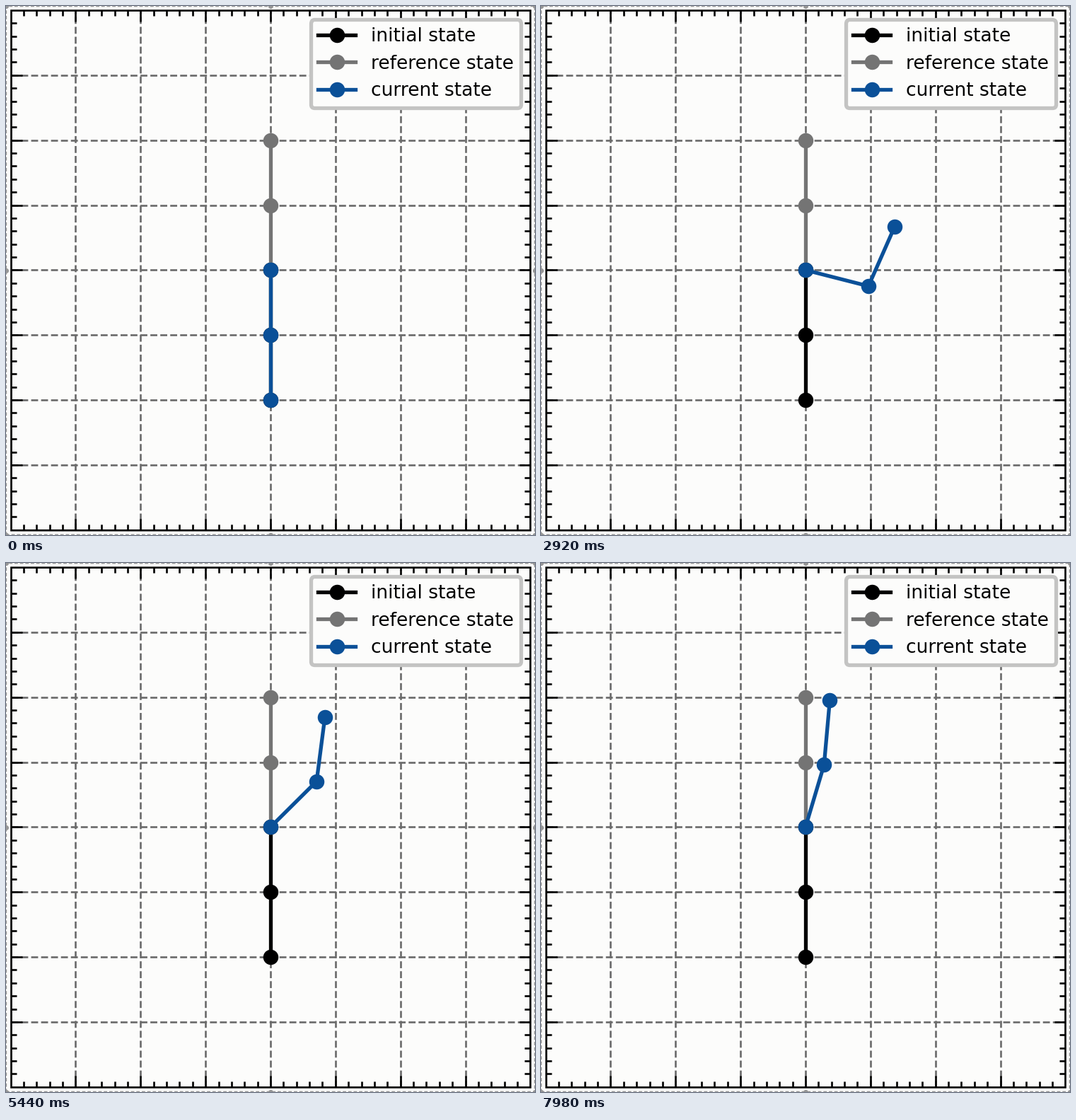
These frames come from a looping animation (748 px wide and 748 px high, 8 s). A matplotlib script:

```python
import numpy as np
import matplotlib.pyplot as plt
from matplotlib.animation import FuncAnimation
from matplotlib.lines import Line2D
from matplotlib.patches import Rectangle

SIZE, DPI = 748, 64
PX = 72 / DPI                      # points per pixel
UNIT = 91.85                       # pixels per link length
EM = 26.5
PAPER, GRID, EDGE = "#fcfcfb", "#6a6a6a", "#969696"
BLACK, GRAY, BLUE = "#000000", "#747474", "#0a5098"
TICK = 20                          # ms per drawn frame
LOOP = 8000

# Simulation step, absolute link angles (degrees from straight down) and rates
STEPS = np.array([0, 25, 62, 94, 116, 139, 171])
SHOULDER = ([0, 18.4, 75.7, 98.2, 134.8, 150.5, 163.4],
            [0, 1.6, 0.9, 1.1, 0.95, 0.54, 0.3])
ELBOW = ([0, 100, 156.2, 186.9, 172.6, 172.05, 174.9],
         [0, 2.9, 1.2, 0.1, -0.3, 0.06, 0.09])


def hermite(n, curve):
    value, rate = curve
    i = min(np.searchsorted(STEPS, n, side="right") - 1, len(STEPS) - 2)
    h = STEPS[i + 1] - STEPS[i]
    s = (n - STEPS[i]) / h
    return ((1 + 2 * s) * (1 - s) ** 2 * value[i]
            + s * (1 - s) ** 2 * h * rate[i]
            + s * s * (3 - 2 * s) * value[i + 1]
            + s * s * (s - 1) * h * rate[i + 1])


def step_at(ms):
    """Steps last 20, 20 and 100 ms in turn."""
    cycle, rest = divmod(ms + 20, 140)
    return 3 * cycle + min(rest // 20, 2) - 1


def arm(a, b):
    a, b = np.radians([a, b])
    x = np.cumsum([0, np.sin(a), np.sin(b)])
    y = np.cumsum([0, -np.cos(a), -np.cos(b)])
    return x, y


fig = plt.figure(figsize=(SIZE / DPI, SIZE / DPI), dpi=DPI, facecolor=PAPER)
left, bottom, side = 6.6, 7.2, 8 * UNIT
ax = fig.add_axes([left / SIZE, bottom / SIZE, side / SIZE, side / SIZE])
ax.set(xlim=(-4, 4), ylim=(-4, 4))
ax.set_axis_off()

# Grid, frame and inward ticks
thin = 2.65 * PX
major = np.arange(-3, 4)
minor = np.array([k / 5 for k in range(-19, 20) if k % 5])
for draw in (ax.vlines, ax.hlines):
    draw(major, -4, 4, colors=GRID, linestyles="--", lw=thin, zorder=1)
    for places, length in ((major, 15.9 / UNIT), (minor, 7.95 / UNIT)):
        draw(places, -4, -4 + length, colors=BLACK, lw=thin, zorder=1.5)
        draw(places, 4 - length, 4, colors=BLACK, lw=thin, zorder=1.5)
ax.add_patch(Rectangle((-4, -4), 8, 8, fill=False, ec=BLACK, lw=thin,
                       clip_on=False, zorder=2.5))

# Faint dashed outline with handles along the stage edge
fig.add_artist(Line2D([0, 1, 1, 0, 0], [0, 0, 1, 1, 0], color=EDGE,
                      lw=2.4 * PX, dashes=(2, 1.2)))
spots = [(x, y) for x in (0, 0.5, 1) for y in (0, 0.5, 1) if (x, y) != (0.5, 0.5)]
fig.add_artist(Line2D(*zip(*spots), ls="", marker="o", ms=7 * PX,
                      color=EDGE, mew=0))


def add_arm(angles, color, label):
    line, = ax.plot(*arm(*angles), "-o", color=color, lw=5.3 * PX,
                    ms=21.5 * PX, mew=0, label=label)
    return line


add_arm((0, 0), BLACK, "initial state")
add_arm((180, 180), GRAY, "reference state")
current = add_arm((0, 0), BLUE, "current state")

legend = ax.legend(loc="upper right", framealpha=1, facecolor=PAPER,
                   edgecolor="#c4c4c3", labelspacing=0.48,
                   prop={"family": "DejaVu Sans", "size": EM * PX})
legend.get_frame().set_linewidth(5.3 * PX)


def update(i):
    n = step_at(i * TICK)
    current.set_data(*arm(hermite(n, SHOULDER), hermite(n, ELBOW)))
    return current,


anim = FuncAnimation(fig, update, frames=LOOP // TICK, interval=TICK,
                     repeat=True, repeat_delay=0)
plt.show()
```
